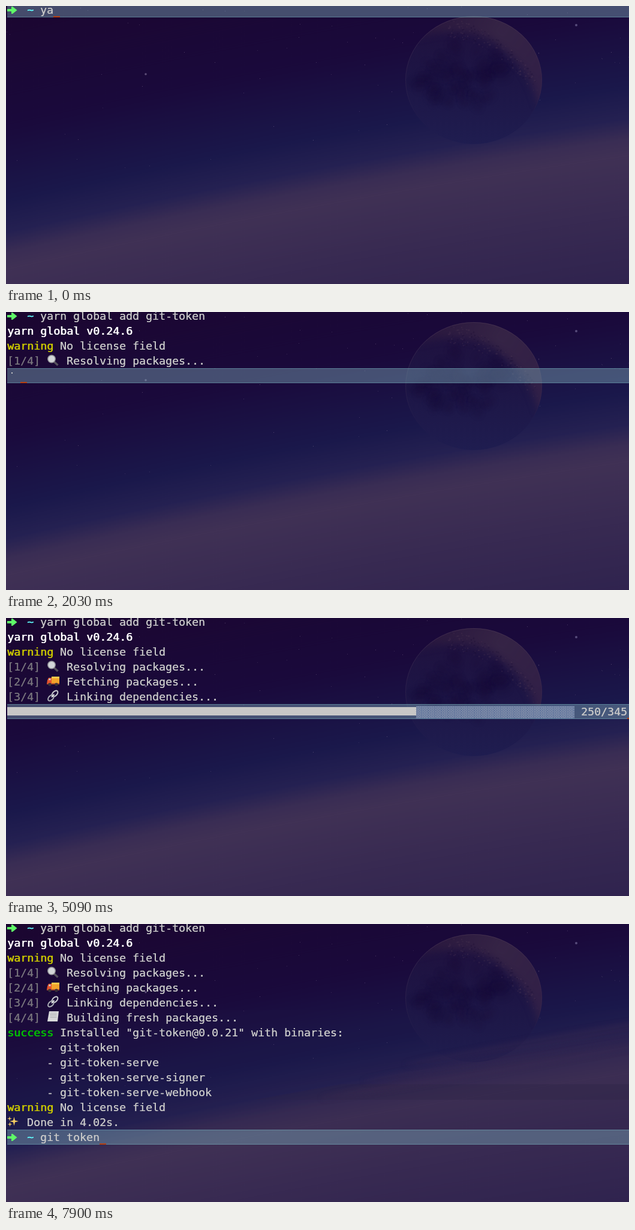
Recreate the animation shown at these times as an HTML page with a canvas. Size 1039 by 465 pixels, loop 8 s.

```html
<!DOCTYPE html>
<html lang="en">
<head>
<meta charset="utf-8">
<title>Terminal install</title>
<style>
  html, body { margin: 0; width: 100%; height: 100%; overflow: hidden; background: #1a0836; }
  canvas { display: block; }
</style>
</head>
<body>
<canvas id="stage" width="1039" height="465"></canvas>
<script>
const W = 1039, H = 465, LOOP = 8000;
const CELL = 11, ROW = 25, LEFT = 2, COLS = 94;
const FONT = '18.27px "DejaVu Sans Mono", monospace';
const GREY = '#c7c7c7', DIM = '#77747c', YELLOW = '#c7c400', GREEN = '#00c200', CYAN = '#60fdff', LIME = '#5ffa68';

const ctx = document.getElementById('stage').getContext('2d');

function layer(w, h, paint) {
  const c = document.createElement('canvas');
  c.width = w;
  c.height = h;
  paint(c.getContext('2d'));
  return c;
}

function seeded(s) {
  return () => (s = (s * 16807) % 2147483647) / 2147483647;
}

function ramp(g, x1, y1, x2, y2, stops) {
  const fill = g.createLinearGradient(x1, y1, x2, y2);
  Object.entries(stops).forEach(([at, colour]) => fill.addColorStop(+at, colour));
  return fill;
}

function oval(g, x, y, rx, ry, fill, turn = 0) {
  g.fillStyle = fill;
  g.beginPath();
  g.ellipse(x, y, rx, ry, turn, 0, 7);
  g.fill();
}

// ---------- wallpaper ----------

const horizon = x => 402 - 0.225 * x + 0.00004 * x * x;

// One vertical strip of sky, shifted along the curved horizon
function paintSky(g) {
  const depth = 680;
  const strip = layer(1, depth, s => {
    s.fillStyle = ramp(s, 0, 0, 0, depth, {
      0: '#1c0630', 0.3: '#1a0a3c', 0.48: '#1a184b', 0.56: '#252152',
      0.61: '#3a2d54', 0.65: '#403155', 0.8: '#382a52', 1: '#2e224e'
    });
    s.fillRect(0, 0, 1, depth);
  });
  for (let x = 0; x < W; x++) g.drawImage(strip, x, horizon(x) - 404);
}

function paintStars(g) {
  const rnd = seeded(77);
  for (let i = 0; i < 75; i++) {
    const x = rnd() * W, y = rnd() * (horizon(x) - 70);
    g.fillStyle = `rgba(150,130,160,${0.2 + rnd() * 0.25})`;
    g.fillRect(Math.round(x), Math.round(y), 1, 1);
  }
  oval(g, 951, 32, 2, 2, 'rgba(120,110,155,.65)');
  oval(g, 233, 114, 1.8, 1.8, 'rgba(130,115,155,.65)');
}

function paintMoon(g) {
  const rnd = seeded(2024);
  const cx = 780, cy = 124;
  g.save();
  g.beginPath();
  g.ellipse(cx, cy, 114, 107, 0, 0, 7);
  g.clip();
  g.fillStyle = ramp(g, 0, 17, 0, 231, { 0: '#20113e', 0.5: '#1d1545', 1: '#1f1d50' });
  g.fillRect(660, 10, 240, 230);

  // Lit crescent along the upper right
  g.filter = 'blur(7px)';
  g.fillStyle = ramp(g, 690, 30, 895, 150, { 0: 'rgba(48,28,62,.6)', 0.5: 'rgba(56,38,70,.9)', 1: 'rgba(54,34,72,.8)' });
  g.beginPath();
  g.moveTo(685, 52);
  g.bezierCurveTo(730, 38, 790, 38, 822, 66);
  g.bezierCurveTo(850, 90, 872, 105, 888, 165);
  g.lineTo(920, 160);
  g.lineTo(905, 5);
  g.lineTo(690, 5);
  g.fill();

  // Dark plains: many faint patches left of the terminator
  g.filter = 'blur(3px)';
  for (let i = 0; i < 60; i++) {
    const a = rnd() * 6.28, r = Math.sqrt(rnd());
    oval(g, 762 + 78 * r * Math.cos(a), 115 + 55 * r * Math.sin(a), 6 + rnd() * 14, 4 + rnd() * 9, 'rgba(23,11,57,.2)', a);
  }

  // Rough surface near the terminator
  g.filter = 'none';
  for (let i = 0; i < 150; i++) {
    const k = rnd(), x = 735 + 152 * k, y = 38 + 100 * k * k + (rnd() - 0.5) * 30;
    oval(g, x, y, 0.6 + rnd() * 1.4, 0.5 + rnd(), rnd() < 0.5 ? 'rgba(90,64,88,.25)' : 'rgba(26,10,50,.3)');
  }
  g.restore();

  g.strokeStyle = ramp(g, 0, 20, 0, 190, { 0: 'rgba(80,58,88,.5)', 0.7: 'rgba(62,44,82,.35)', 1: 'rgba(60,48,86,0)' });
  g.beginPath();
  g.ellipse(cx, cy, 113.5, 106.5, 0, 0, 7);
  g.stroke();
}

const wallpaper = layer(W, H, g => {
  paintSky(g);
  paintStars(g);
  paintMoon(g);
});

// Streaks of cloud that appear once the long output is printed
const clouds = layer(W, H, g => {
  g.beginPath();
  g.rect(0, 144, W, 225);
  g.clip();
  g.fillStyle = 'rgba(36,28,76,.14)';
  g.fillRect(0, 144, W, 225);
  g.fillStyle = 'rgba(45,34,68,.3)';
  g.beginPath();
  g.moveTo(415, 294);
  g.lineTo(560, 268);
  g.lineTo(W, 268);
  g.lineTo(W, 294);
  g.fill();
  g.filter = 'blur(5px)';
  for (let i = 0; i < 3; i++) oval(g, 960 - 70 * i, 185 + 28 * i, 300, 7, 'rgba(72,50,80,.25)', -0.17);
});

// Staggered dots, four to a cell
const shade = ctx.createPattern(layer(CELL, 4, g => {
  g.fillStyle = 'rgba(50,84,156,.55)';
  g.fillRect(0, 0, CELL, 4);
  g.fillStyle = GREY;
  const pitch = CELL / 4;
  for (let i = 0; i < 4; i++) {
    g.fillRect(i * pitch, 0, 1.6, 1.4);
    g.fillRect((i + 0.5) * pitch, 2, 1.6, 1.4);
  }
}), 'repeat');

// ---------- terminal pieces ----------

const colX = c => LEFT + c * CELL;

function write(row, col, text, colour = GREY, bold = false) {
  const x = colX(col), y = row * ROW + 13;
  ctx.fillStyle = colour;
  ctx.fillText(text, x, y);
  ctx.fillText(text, x + (bold ? 0.7 : 0.3), y);
}

function poly(fill, ...points) {
  ctx.fillStyle = fill;
  ctx.beginPath();
  points.forEach(([x, y]) => ctx.lineTo(x, y));
  ctx.fill();
}

function box(x, y, w, h, fill) {
  ctx.fillStyle = fill;
  ctx.fillRect(x, y, w, h);
}

const disc = (x, y, r, fill) => oval(ctx, x, y, r, r, fill);

function line(x1, y1, x2, y2, colour, width) {
  ctx.strokeStyle = colour;
  ctx.lineWidth = width;
  ctx.beginPath();
  ctx.moveTo(x1, y1);
  ctx.lineTo(x2, y2);
  ctx.stroke();
}

function ring(x, y, colour) {
  ctx.strokeStyle = colour;
  ctx.lineWidth = 2;
  ctx.beginPath();
  ctx.ellipse(x, y, 6, 3.6, -0.8, 0, 7);
  ctx.stroke();
}

function sparkle(x, y, r) {
  const tips = Array.from({ length: 8 }, (_, i) => {
    const q = i % 2 ? r * 0.28 : r, a = i * Math.PI / 4;
    return [x + Math.cos(a) * q, y + Math.sin(a) * q];
  });
  poly('#f6cf62', ...tips);
}

// Icons fill a box of about 20 by 18
const icons = {
  lens() {
    line(12, 12, 18.5, 18, '#55525c', 3.4);
    disc(8, 7.5, 7, '#8d8d93');
    disc(8, 7.5, 5.5, '#d3d6d8');
  },
  truck() {
    box(8, 2, 13, 11, '#f3a32b');
    box(8, 2, 13, 3, '#fbc94b');
    poly('#e5532d', [0, 14], [1, 8], [3, 4], [8, 4], [8, 14]);
    box(3.5, 5.5, 3, 2.5, '#bfd9e2');
    box(0, 13, 21, 2, '#b4502a');
    disc(5, 15, 2.6, '#3a3238');
    disc(16, 15, 2.6, '#3a3238');
  },
  link() {
    ring(13.5, 5.5, '#c9ccd0');
    ring(7, 12.5, '#a9adb4');
    line(8, 11.5, 12.5, 6.5, '#e0e2e4', 1.6);
  },
  page() {
    poly('#d9dadb', [4, 0], [20, 0], [18, 17], [1, 17]);
    for (let y = 3; y < 13; y += 2.5) line(5.5, y, 16.5, y, '#a4a6aa', 0.8);
  },
  stars() {
    sparkle(11.5, 9, 7.5);
    sparkle(4, 4.5, 4);
    sparkle(4.5, 14, 4);
  }
};

function icon(name, row, col) {
  ctx.save();
  ctx.translate(colX(col), row * ROW - 4);
  icons[name]();
  ctx.restore();
}

function prompt(row, text) {
  const y = row * ROW + 7;
  box(2, y - 2, 9, 4, LIME);
  poly(LIME, [9, y - 6], [11, y - 6], [18.5, y], [11, y + 6], [9, y + 6]);
  write(row, 3, '~', CYAN, true);
  write(row, 5, text);
}

function stage(row, n, name, text) {
  write(row, 0, `[${n}/4]`, DIM);
  icon(name, row, 6);
  write(row, 9, text);
}

function warning(row) {
  write(row, 0, 'warning', YELLOW, true);
  write(row, 8, 'No license field');
}

function summary() {
  write(7, 0, 'success', GREEN, true);
  write(7, 8, 'Installed "git-token@0.0.21" with binaries:');
  ['', '-serve', '-serve-signer', '-serve-webhook'].forEach((end, i) => write(8 + i, 6, '- git-token' + end));
  warning(12);
  icon('stars', 13, 0);
  write(13, 3, 'Done in 4.02s.');
}

function progress(row, done, total) {
  const label = ` ${done}/${total}`;
  const size = COLS - label.length;
  const full = Math.round(done / total * size);
  const y = row * ROW;
  box(colX(full), y - 3, (size - full) * CELL, 21, shade);
  box(LEFT, y - 1, full * CELL, 14, GREY);
  write(row, size, label);
}

// A dot that runs down the left and up the right of a braille cell
function spinner(row, n) {
  const side = n < 4 ? 0 : 1, step = side ? 7 - n : n;
  box(5 + 4 * side, row * ROW + 1 + 4 * step, 2, 2, GREY);
}

function highlight(row) {
  const y = row * ROW - 6, edge = 'rgba(120,185,195,.42)';
  box(LEFT, y, W, ROW, 'rgba(124,167,183,.44)');
  box(LEFT, y, W, 1, edge);
  box(LEFT, y + ROW - 1, W, 1, edge);
}

// ---------- timeline ----------

// When each piece is printed, and the row the cursor moves to
const OUTPUT = [
  { time: 900, next: 1, show() {} },
  { time: 1250, next: 2, show: () => write(1, 0, 'yarn global v0.24.6', '#fff', true) },
  { time: 1310, next: 3, show: () => warning(2) },
  { time: 1370, next: 4, show: () => stage(3, 1, 'lens', 'Resolving packages...') },
  { time: 2150, next: 5, show: () => stage(4, 2, 'truck', 'Fetching packages...') },
  { time: 2990, next: 6, show: () => stage(5, 3, 'link', 'Linking dependencies...') },
  { time: 5210, next: 7, show: () => stage(6, 4, 'page', 'Building fresh packages...') },
  { time: 5260, next: 14, show: summary }
];

// Steps taken since a moment, one per gap, the first at once
const steps = (t, from, gap, max) => Math.max(0, Math.min(max, 1 + Math.floor((t - from) / gap)));
const fetched = t => Math.round(337 * (steps(t, 2210, 60, 13) / 13) ** 1.283);
const linked = t => t < 5090 ? 0 : t < 5150 ? 250 : 345;
const typed = t => 'git token'.slice(0, steps(t, 6880, 120, 4) + steps(t, 7420, 120, 5));
const within = (t, from, to) => t >= from && t < to;

function draw(t) {
  const printed = OUTPUT.filter(o => t >= o.time);
  const row = printed.length ? printed[printed.length - 1].next : 0;
  const command = t < 240 ? 'ya' : 'yarn global add git-token';

  ctx.drawImage(wallpaper, 0, 0);
  if (t >= 5260) ctx.drawImage(clouds, 0, 0);
  highlight(row);
  ctx.font = FONT;
  prompt(0, command);
  printed.forEach(o => o.show());

  let col = row === 0 ? 5 + command.length : 0;
  if (within(t, 1430, 2150)) {
    spinner(4, steps(t, 1490, 90, 7));
    col = 2;
  } else if (within(t, 2150, 2990)) {
    progress(5, fetched(t), 337);
    col = COLS;
  } else if (within(t, 3170, 5210)) {
    progress(6, linked(t), 345);
    col = COLS;
  } else if (row === 14) {
    prompt(14, typed(t));
    col = 5 + typed(t).length;
  }

  const blinkedOff = within(t, 4550, 5090) || within(t, 6640, 6880);
  if (!blinkedOff) box(colX(col), row * ROW + 17, CELL, 2, '#b8400f');
}

const start = performance.now();
function tick() {
  draw((performance.now() - start) % LOOP);
  requestAnimationFrame(tick);
}
tick();
</script>
</body>
</html>
```
